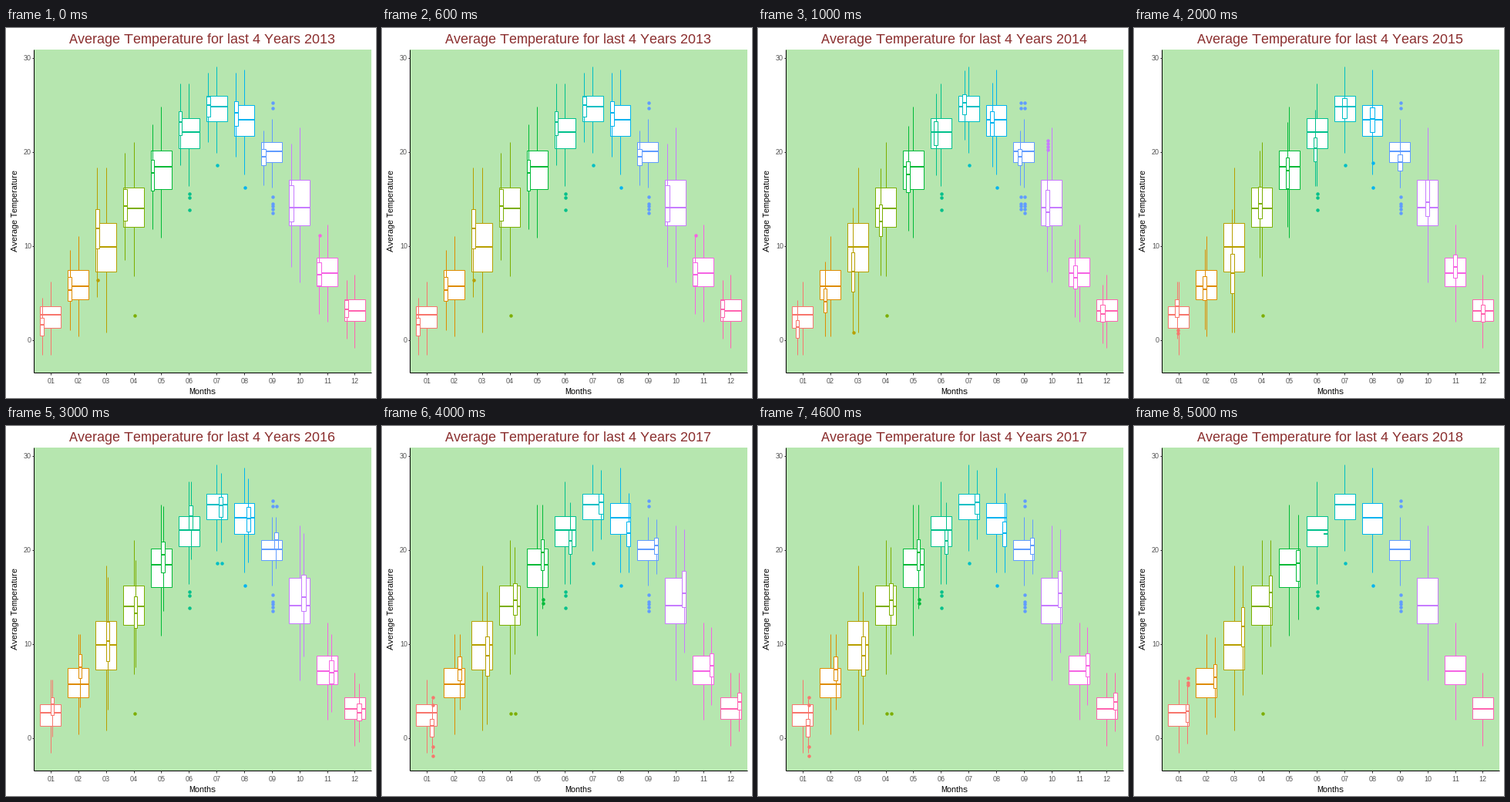
A matplotlib script for the animation above (6000 ms loop, 480 by 480 pixels).

```python
import matplotlib.pyplot as plt
from matplotlib.animation import FuncAnimation
from matplotlib.patches import Rectangle

SIZE, DPI = 480, 72
FIRST_X, STEP = 57.945, 35.867
DODGE = 0.75 * STEP
REACH_UP, REACH_DOWN = 1.15, 1.25   # whisker lengths in box heights
YEAR_SCALE = 0.8                    # height of a year's box against all years
COLORS = ["#F8766D", "#DE8C00", "#B79F00", "#7CAE00", "#00BA38", "#00C08B",
          "#00BFC4", "#00B4F0", "#619CFF", "#C77CFF", "#F564E3", "#FF64B0"]

# Quartiles of each month over all years, as heights on the stage
QUARTILES = [(361, 372, 389), (314, 335, 352), (253, 284, 316), (207, 234, 258),
             (159, 180, 209), (117, 135, 156), (88, 102, 121), (100, 119, 140),
             (148, 160, 174), (197, 233, 256), (298, 318, 335), (352, 367, 380)]

# How far each year's monthly median lies below the common one
SHIFTS = [[13, 5, -24, -3, 8, -13, -2, -9, 7, 0, 2, -2],
          [16, 20, 32, 17, 10, 0, -5, 4, 7, 6, 6, 4],
          [-11, 4, 34, -6, 5, 21, 0, -1, 14, -7, -8, 4],
          [-11, -22, -5, 9, -13, -18, 1, 1, -12, -11, 2, 5],
          [17, -19, 14, -8, -16, 14, -3, 20, -5, -16, -7, -9],
          [-2, -9, -24, -18, -2, 5]]

# Outliers by month, for all years and for each year
ALL_DOTS = {3: [373], 5: [215, 220, 236], 6: [178], 7: [207],
            8: [97, 104, 219, 228, 231, 235, 240]}
YEAR_DOTS = [{2: [327], 10: [269]},
             {2: [395], 8: ALL_DOTS[8][:-1], 9: range(146, 159, 4)},
             {0: [392, 396], 7: [175]},
             {6: [178], 8: [104]},
             {0: [352, 362, 416, 428], 3: [373], 4: [225, 230]},
             {0: [327, 333, 336]}]

plt.rcParams.update({"font.family": "Liberation Sans", "text.hinting": "native",
                     "text.hinting_factor": 1, "text.kerning_factor": 6})
fig = plt.figure(figsize=(SIZE / DPI, SIZE / DPI), dpi=DPI, facecolor="white")
ax = fig.add_axes([0, 0, 1, 1])
ax.set_xlim(0, SIZE)
ax.set_ylim(SIZE, 0)
ax.axis("off")


def line(xs, ys, color="#333333", width=1, z=1):
    return ax.plot(xs, ys, color=color, lw=width, zorder=z,
                   solid_capstyle="butt")[0]


def label(x, y, text, size, color="black", ha="center", **kw):
    return ax.text(x, y, text, size=size, color=color, ha=ha,
                   va="baseline", **kw)


def month_x(m):
    return FIRST_X + m * STEP


def whiskers(q3, q1):
    height = q1 - q3
    return q3 - REACH_UP * height, q1 + REACH_DOWN * height


def box(x, width, quartiles, ends, dots, color, z):
    """Draw one box with whiskers, median and outliers."""
    q3, med, q1 = quartiles
    top, low = ends
    left, right = round(x - width / 2), round(x + width / 2)
    parts = [line([x, x], [top, q3], color, z=z),
             line([x, x], [q1, low], color, z=z),
             line([left, right + 1], [med, med], color, 2, z + 2)]
    if q1 > q3:
        parts.append(ax.add_patch(Rectangle(
            (left, q3), right - left, q1 - q3, fc="white", ec=color,
            lw=1, joinstyle="miter", zorder=z + 1)))
    if dots:
        parts.append(ax.scatter([round(x) + 0.5] * len(dots), list(dots), s=20,
                                color=color, linewidths=0, zorder=z + 3))
    return parts


def year_box(i, m):
    """Draw one month of one year beside its neighbours."""
    count = 6 if m < 6 else 5   # the last year ends in June
    width = DODGE / count
    x = month_x(m) + (i - (count - 1) / 2) * width
    # the very last month holds a single day, so its box is flat
    scale = 0 if (i, m) == (5, 5) else YEAR_SCALE

    q3, med, q1 = QUARTILES[m]
    mid = med + SHIFTS[i][m]
    high, bottom = mid - scale * (med - q3), mid + scale * (q1 - med)
    top, low = whiskers(high, bottom)
    all_top, all_low = whiskers(q3, q1)
    ends = min(high, max(top, all_top)), max(bottom, min(low, all_low))
    return box(x, width, (high, mid, bottom), ends, YEAR_DOTS[i].get(m),
               COLORS[m], 10)


def draw_static():
    ax.add_patch(Rectangle((36, 28), 438, 419, fc="#B6E6AF", lw=0, zorder=0))
    line([36, 36], [28, 447], "black")
    line([36, 474], [447, 447], "black")
    for temp in range(0, 31, 10):
        y = 405 - 12.2 * temp
        line([33.5, 36], [y, y])
        label(33, y + 3, str(temp), 9, "#4D4D4D", "right")
    for m, color in enumerate(COLORS):
        x = month_x(m)
        line([x, x], [447, 450])
        label(x + 0.3, 461, f"{m + 1:02d}", 9, "#4D4D4D")
        q3, _, q1 = QUARTILES[m]
        box(x, DODGE, QUARTILES[m], whiskers(q3, q1), ALL_DOTS.get(m), color, 2)
    label(254.5, 475, "Months", 11)
    label(15, 237.5, "Average Temperature", 11, rotation=90,
          rotation_mode="anchor")


draw_static()
title = label(254.5, 20, "", 18, "#8B2F2F")
shown = []


def clear():
    while shown:
        shown.pop().remove()
    return []


def update(i):
    clear()
    title.set_text(f"Average Temperature for last 4 Years {2013 + i}")
    for m in range(len(SHIFTS[i])):
        shown.extend(year_box(i, m))
    return shown


anim = FuncAnimation(fig, update, frames=6, interval=1000, init_func=clear,
                     repeat=True, repeat_delay=0, blit=False)
plt.show()
```
